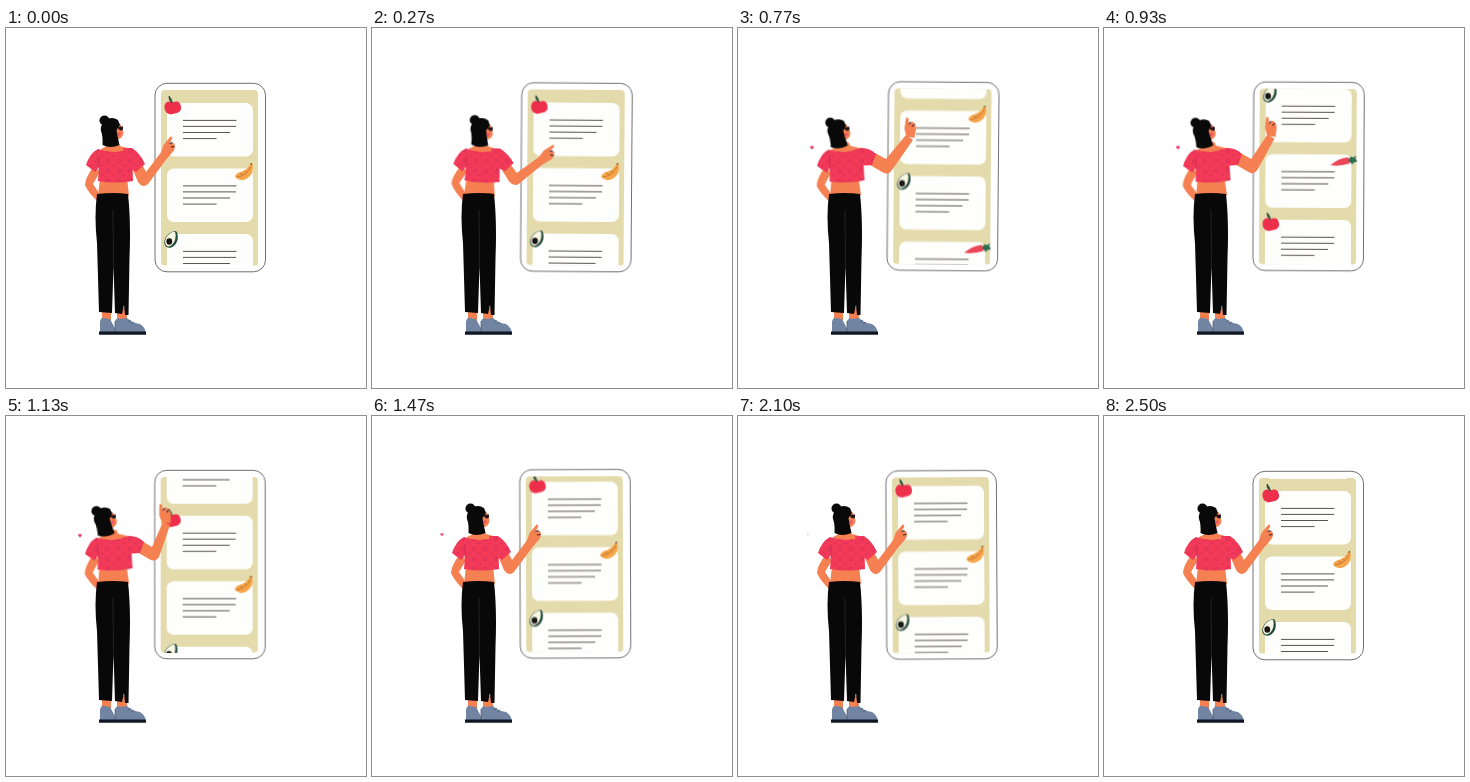
An HTML page without scripts that plays this animation: 360x360 px, repeating every 2.53 s.

```html
<!DOCTYPE html>
<html lang="en">
<head>
<meta charset="utf-8">
<title>Scrolling a list</title>
<style>
html, body { margin: 0; width: 100%; height: 100%; overflow: hidden; background: #fff; }
svg { display: block; width: 100vw; height: 100vh; }

.phone, .list, .torso, .head, .arm, .sleeve, .hand, .heart {
  animation: 2530ms ease-in-out infinite;
}
.phone { transform-origin: 204px 149px; animation-name: phone; }
.list { animation-name: list; }
.torso { transform-origin: 107px 165px; animation-name: torso; }
.head { transform-origin: 107px 118px; animation-name: head; }
.arm { animation-name: arm; }
.sleeve { animation-name: sleeve; }
.hand { transform-origin: 158px 127px; animation-name: hand; }
.heart { animation-name: heart; }

@keyframes phone {
  0%, 98.8%, 100% { transform: none; }
  20.95% { transform: translate(.3px, -.5px) rotate(.8deg); }
  30.43% { transform: translate(.8px, -1.2px) rotate(.5deg); }
  44.66% { transform: translate(-.3px, -1px) rotate(0deg); }
  58.1% { transform: translate(-1px, -1.7px) rotate(-.2deg); }
  69.96% { transform: translate(-1.2px, -1.2px) rotate(-.5deg); }
}
@keyframes list {
  0% { transform: translateY(0); }
  20.95% { transform: translateY(0); animation-timing-function: cubic-bezier(.4, 0, .75, .5); }
  30.43% { transform: translateY(-56px); animation-timing-function: cubic-bezier(.3, .28, .7, .85); }
  44.66% { transform: translateY(-236px); animation-timing-function: cubic-bezier(.2, .5, .5, 1); }
  57%, 70% { transform: translateY(-269.5px); }
  98.8%, 100% { transform: translateY(-262px); }
}
@keyframes torso {
  0%, 58.1%, 100% { transform: none; }
  20.95% { transform: rotate(5deg); }
  30.43%, 44.66% { transform: rotate(-2deg); }
}
@keyframes head {
  0%, 58.1%, 100% { transform: none; }
  20.95% { transform: translate(1px, 0) rotate(2deg); }
  30.43% { transform: translate(-2px, 1px) rotate(-4deg); }
  44.66% { transform: translate(-3px, 1px) rotate(-6deg); }
}
@keyframes arm {
  0%, 58.1%, 100% { d: path("M127 142L132 154Q137 161 142 156L162 129L156 123L140 144L137 138Z"); }
  20.95% { d: path("M132 141L142 153Q147 158 152 155L181 141L178 134L149 146L141 136Z"); }
  30.43% { d: path("M127 134L144 144Q150 148 154 142L175 112L168 107L148 131L137 125Z"); }
  44.66% { d: path("M126 133L143 143Q149 147 153 141L164 109L157 106L146 131L136 125Z"); }
}
@keyframes sleeve {
  0%, 58.1%, 100% { d: path("M117 120L126 120Q134 125 139 136L130 144L120 138Z"); }
  20.95% { d: path("M121 121L130 121Q138 126 144 134L136 142L123 138Z"); }
  30.43%, 44.66% { d: path("M115 122L124 120Q132 120 138 126L134 137L120 138Z"); }
}
@keyframes hand {
  0%, 58.1%, 100% { transform: none; }
  20.95% { transform: translate(21px, 10px) rotate(36deg); }
  30.43% { transform: translate(14px, -18px) rotate(-31deg); }
  44.66% { transform: translate(2px, -20px) rotate(-39deg); }
}
@keyframes heart {
  0%, 8%, 96%, 100% { transform: translate(70px, 120px) scale(0); }
  20.95% { transform: translate(70px, 120.5px) scale(.8); }
  30.43%, 44.66% { transform: translate(74px, 119.5px) scale(1); }
  58.1% { transform: translate(70px, 118.5px) scale(.9); }
  69.96% { transform: translate(70px, 116.5px) scale(.6); }
}
</style>
</head>
<body>
<svg viewBox="0 0 360 360">
  <defs>
    <clipPath id="screen"><rect x="152" y="62" width="105" height="175.500"/></clipPath>
    <pattern id="print" width="11" height="10" patternUnits="userSpaceOnUse">
      <rect width="11" height="10" fill="#f23a58"/>
      <g fill="none" stroke="#d22c5c" stroke-width=".8">
        <circle cx="3" cy="3" r="1.6"/><path d="M7 8q1.5-3 3 0"/>
      </g>
    </pattern>
    <g id="card">
      <rect x="161" width="86" height="53.5" rx="7" fill="#fefefc"/>
      <path d="M177 17.4h53.5M177 23.4h53M177 29.5h47M177 35.6h33.5" stroke="#2c2928" stroke-width=".8"/>
    </g>
    <g id="apple">
      <use href="#card"/>
      <path d="M166.500-.5C162-3 158 0 158.500 5S163 12 166.500 11 175.500 10 175 4 170-2.500 166.500-.5Z" fill="#ee2f4b"/>
      <path d="M166.500 0Q166-4 163-7Q162-3 166.500 0Z" fill="#294a37" stroke="#294a37" stroke-width=".7"/>
    </g>
    <g id="banana">
      <use href="#card"/>
      <path d="M229 8.500Q230 4 236 3Q241 1 243.500-3L245-5.500L246.500-4.500Q248 6 241 10T229 8.500Z" fill="#f6a548"/>
      <path d="M231 8.500Q241 7 245-2M234 5l3 1M239 3l2 1" fill="none" stroke="#b96b31" stroke-width=".8"/>
      <path d="M244.500-4l1.500-1" stroke="#604027" stroke-width="1.200"/>
    </g>
    <g id="avocado">
      <use href="#card"/>
      <path d="M170-3C164-3 157 4 158.500 10S169 15 171.500 6Q172.500-1 170-3Z" fill="#234b3c"/>
      <path d="M168.500-2.500C164-2 158 4 159.200 9.300S167 13 169.300 5Q170.300-1 168.500-2.500Z" fill="#f8f6e4"/>
      <ellipse cx="163.300" cy="7.500" rx="2.900" ry="3.200" fill="#171514"/>
    </g>
    <g id="carrot">
      <use href="#card"/>
      <path d="M226 10.800Q234 4 243 2.800Q247 5 245 9Q236 12 226 10.800Z" fill="#ea4657"/>
      <path d="M244 6l2-4 3 1 3-2-1 3 2 3-4 1-1 2z" fill="#2c6d50"/>
    </g>
  </defs>

  <g class="phone">
    <rect x="149" y="55.3" width="110.500" height="188.500" rx="12" fill="#fff" stroke="#222" stroke-width=".65"/>
    <g clip-path="url(#screen)">
      <rect x="155" y="62" width="97" height="176" rx="4" fill="#e4dbad"/>
      <g class="list">
        <use href="#apple" y="75"/>
        <use href="#banana" y="140.5"/>
        <use href="#avocado" y="206"/>
        <use href="#carrot" y="271.5"/>
        <use href="#apple" y="337"/>
        <use href="#banana" y="402.5"/>
        <use href="#avocado" y="468"/>
      </g>
    </g>
  </g>

  <path class="heart" d="M0 2L-2-.5Q-1.500-2 0-1Q1.500-2 2-.5Z" fill="#e62850"/>

  <g class="legs">
    <path d="M96 280h9v14h-9zM111 280h10v14h-10z" fill="#f58051"/>
    <path d="M94 304V294Q95 289 98 290L104 291L111 304ZM109 304V293Q111 289 114 291L121 290Q126 295 134 296Q139 299 139.500 304Z" fill="#7184a1"/>
    <path d="M109 293v11M122 294l3-2M125 296l3-2" stroke="#45546f" stroke-width=".7"/>
    <path d="M93 303.500h47v3.300H93z" fill="#111722"/>
  </g>

  <g class="torso">
    <path d="M88 138Q79 150 79 157Q82 164 91 173L95 168L87 156L94 144Z" fill="#f58051"/>
    <path d="M94 150h27l2 18H92zM100 114h12l2 4 11 3v8H95v-8l6-3z" fill="#f58051"/>
    <path d="M92 121Q108 127 126 120.500L127 153Q109 156 92 153L93 139L89 144L80 137Q84 125 92 121Z" fill="url(#print)"/>
    <path d="M93 128v14M125 129l-1 13" stroke="#c72750" stroke-width=".7"/>
    <g class="head">
      <path d="M108 95Q116 94 116.500 101L117.500 105Q116 112 110 111Z" fill="#f58051"/>
      <circle cx="113" cy="106" r="1.800" fill="#ee5560"/>
      <path d="M111 99l6-.5v3q-2 2-4 0z" fill="#23161c"/>
      <circle cx="98.500" cy="92.500" r="5" fill="#090909"/>
      <path d="M97 95Q104 87 112 92L114 97L110.500 102L111.500 108L113.500 117Q104 121 96.500 117Q97 108 95 103Q94 99 97 95Z" fill="#090909"/>
    </g>
  </g>

  <path d="M91 166Q107 164 122 166Q125 193 123.500 230L122.500 287L119 287L118 277L116 286L109 285L107.500 238L106 285L93 284L91 215Q88 188 91 166Z" fill="#080808"/>
  <path d="M107 182l.5 56" stroke="#383536" stroke-width=".6"/>

  <path class="arm" d="M127 142L132 154Q137 161 142 156L162 129L156 123L140 144L137 138Z" fill="#f58051"/>
  <path class="sleeve" d="M117 120L126 120Q134 125 139 136L130 144L120 138Z" fill="url(#print)"/>
  <g class="hand">
    <path d="M155 125L157.500 117L164.500 108.500Q167 109 166 111L163.500 115.500L168 115Q170 119 167.500 123L161.500 130Z" fill="#f58051"/>
    <path d="M163.500 115.500l3-.8M165 119l3.500-.5" stroke="#3a2028" stroke-width="1.200"/>
  </g>
</svg>
</body>
</html>
```
